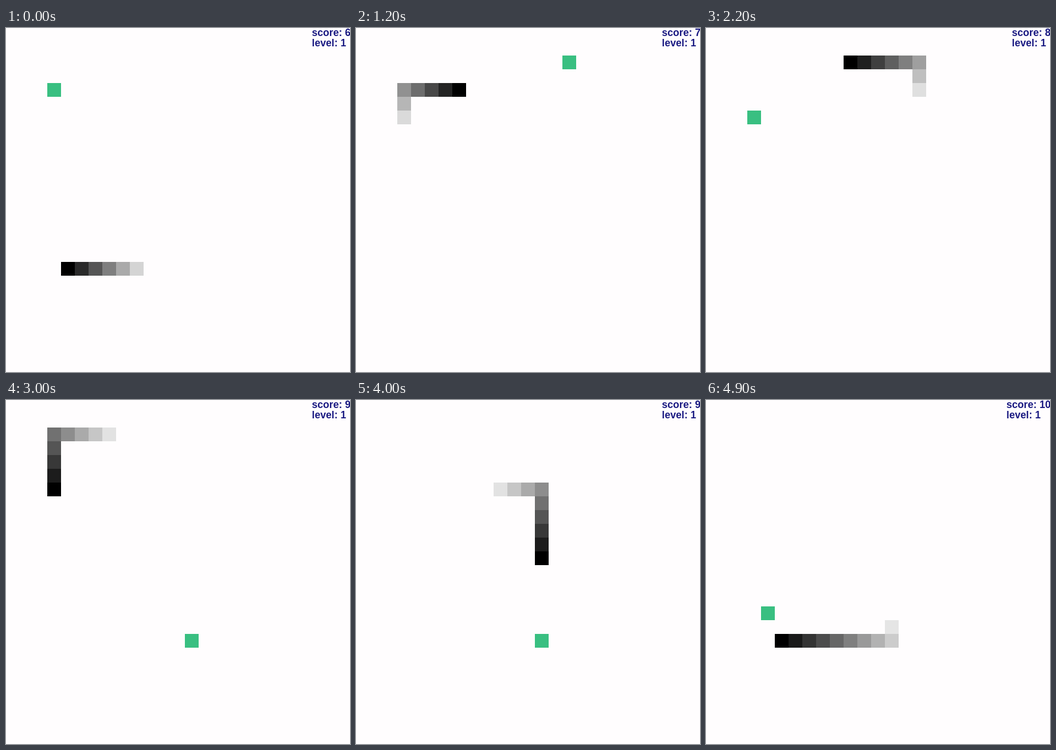
Write an HTML page that moves like this. It is 600 px wide and 600 px high and loops after 5 s.

```html
<!DOCTYPE html>
<html lang="en">
<head>
<meta charset="utf-8">
<title>Snake</title>
<style>
  html, body { margin: 0; width: 100%; height: 100%; overflow: hidden; background: #fffdfe; }
  svg { display: block; width: 100vw; height: 100vh; }
  text { font: bold 17.6px "Liberation Sans", Arial, sans-serif; fill: #1a1a82; }
</style>
</head>
<body>
<svg viewBox="0 0 600 600">
  <g id="board" shape-rendering="crispEdges"></g>
  <text id="score" y="14"></text>
  <text id="level" y="32">level: 1</text>
</svg>
<script>
const CELL = 24, TICK = 100, TICKS = 50;
const START_LENGTH = 6, MAX_LENGTH = 10;
const FOOD_COLOR = '#39bf81';

// Runs of the head: dx, dy, cells. The first five cells are the starting body.
const RUNS = [
  [-1, 0, 6], [0, -1, 13], [1, 0, 12], [0, -1, 2], [-1, 0, 12],
  [0, 1, 4], [1, 0, 10], [0, 1, 11], [-1, 0, 8]
];
const FOODS = [[3, 4], [15, 2], [3, 6], [13, 17], [4, 15]];
const EATEN_AT = [14, 28, 44, 65];

const path = [[9, 17]];
for (const [dx, dy, cells] of RUNS) {
  for (let i = 0; i < cells; i++) {
    const [x, y] = path[path.length - 1];
    path.push([x + dx, y + dy]);
  }
}

const board = document.getElementById('board');
const score = document.getElementById('score');
const level = document.getElementById('level');

function addCell(color) {
  const rect = document.createElementNS('http://www.w3.org/2000/svg', 'rect');
  rect.setAttribute('width', CELL);
  rect.setAttribute('height', CELL);
  rect.setAttribute('fill', color);
  return board.appendChild(rect);
}

function place(rect, [x, y]) {
  rect.setAttribute('x', x * CELL);
  rect.setAttribute('y', y * CELL);
}

const food = addCell(FOOD_COLOR);
const body = Array.from({ length: MAX_LENGTH }, () => addCell('#000'));

// Three moves every two ticks, with a slight delay in the middle of the run.
function movesAt(tick) {
  const delay = tick >= 26 && tick <= 40 ? 0.1 : 0;
  return Math.floor(tick * 1.5 - delay);
}

function draw(tick) {
  const moves = movesAt(tick);
  const eaten = EATEN_AT.filter(m => m <= moves).length;
  const length = START_LENGTH + eaten;
  const head = moves + START_LENGTH - 1;

  place(food, FOODS[eaten]);
  body.forEach((rect, i) => {
    rect.style.display = i < length ? '' : 'none';
    if (i >= length) return;
    const gray = Math.floor(255 * i / length);
    place(rect, path[head - i]);
    rect.setAttribute('fill', `rgb(${gray},${gray},${gray})`);
  });

  const left = length < 10 ? 533.5 : 524;
  score.textContent = 'score: ' + length;
  score.setAttribute('x', left);
  level.setAttribute('x', left);
}

let shown = -1;
function frame() {
  const tick = Math.floor(performance.now() / TICK) % TICKS;
  if (tick !== shown) draw(shown = tick);
  requestAnimationFrame(frame);
}
frame();
</script>
</body>
</html>
```
